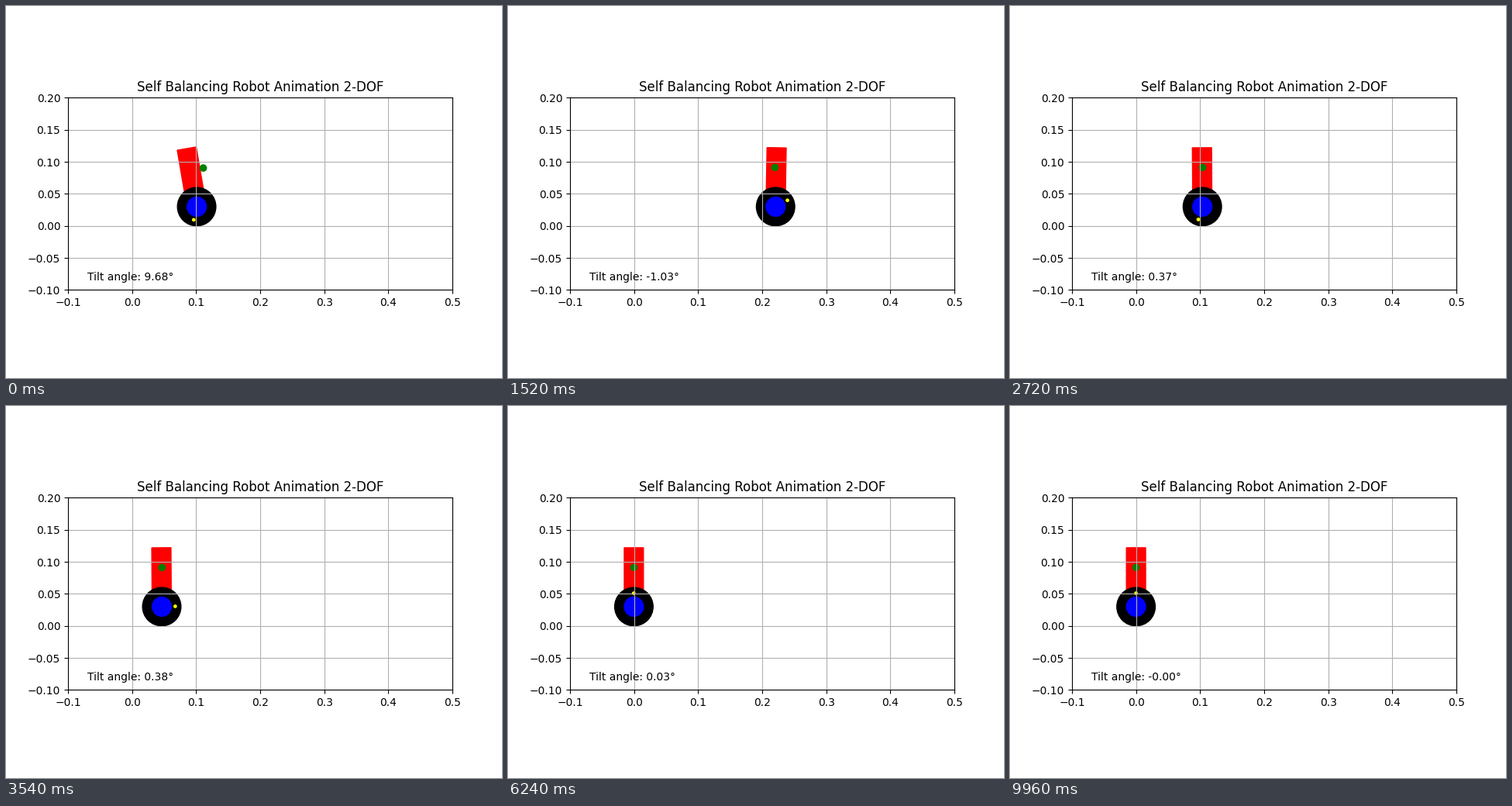
Recreate the animation shown at these times as a matplotlib script. Size 640 by 480 pixels, loop 9980 ms.

```python
import numpy as np
import matplotlib.pyplot as plt
from matplotlib.animation import FuncAnimation
from matplotlib.patches import Circle, Rectangle

FRAMES, STEP_MS = 499, 20

# Geometry in metres
WHEEL_R = 0.03
HUB_R = 0.015
MARK_DIST = 0.021
BODY_W, BODY_H = 0.03, 0.092
COM_DIST = 0.0612

# Linear model: x'' = G * tilt - H * tilt'', closed loop with these poles
G, H = 6.33, 0.11
POLES = np.array([-1 + 0.55j, -1 - 0.55j, -2.6, -41.5])
X0, TILT0 = 0.1, np.radians(10)


def simulate():
    """Position and tilt from z, where tilt = z'' and x = G z - H z''."""
    start = [(X0 + H * TILT0) / G, 0, TILT0, 0]
    weights = np.linalg.solve(np.vander(POLES, increasing=True).T, start)
    t = np.arange(1, FRAMES + 1) * STEP_MS / 1000
    modes = weights * np.exp(np.outer(t, POLES))
    z = modes.sum(axis=1).real
    tilt = (modes * POLES**2).sum(axis=1).real
    return G * z - H * tilt, tilt


xs, tilts = simulate()

fig, ax = plt.subplots(figsize=(6.4, 4.8), dpi=100)
ax.set_xlim(-0.1, 0.5)
ax.set_ylim(-0.1, 0.2)
ax.set_aspect("equal")
ax.set_title("Self Balancing Robot Animation 2-DOF")
ax.grid(True)

body = ax.add_patch(Rectangle((0, WHEEL_R), BODY_W, BODY_H, color="red"))


def add_disc(radius, color):
    return ax.add_patch(Circle((0, WHEEL_R), radius, color=color))


wheel = add_disc(WHEEL_R, "black")
hub = add_disc(HUB_R, "blue")
com = add_disc(0.005, "green")
mark = add_disc(0.002, "yellow")
label = ax.text(0.05, 0.05, "", transform=ax.transAxes)


def polar(x, dist, angle):
    """Point at a distance from the axle, angle clockwise from up."""
    return x + dist * np.sin(angle), WHEEL_R + dist * np.cos(angle)


def update(i):
    x, tilt = xs[i], tilts[i]
    axle = (x, WHEEL_R)
    body.set_xy((x - BODY_W / 2, WHEEL_R))
    body.rotation_point = axle
    body.set_angle(np.degrees(tilt))
    wheel.center = hub.center = axle
    com.center = polar(x, COM_DIST, tilt)
    mark.center = polar(x, MARK_DIST, x / WHEEL_R)
    label.set_text(f"Tilt angle: {np.degrees(tilt):.2f}°")
    return body, wheel, hub, com, mark, label


anim = FuncAnimation(fig, update, frames=FRAMES, interval=STEP_MS,
                     repeat=True, repeat_delay=0)
plt.show()
```
